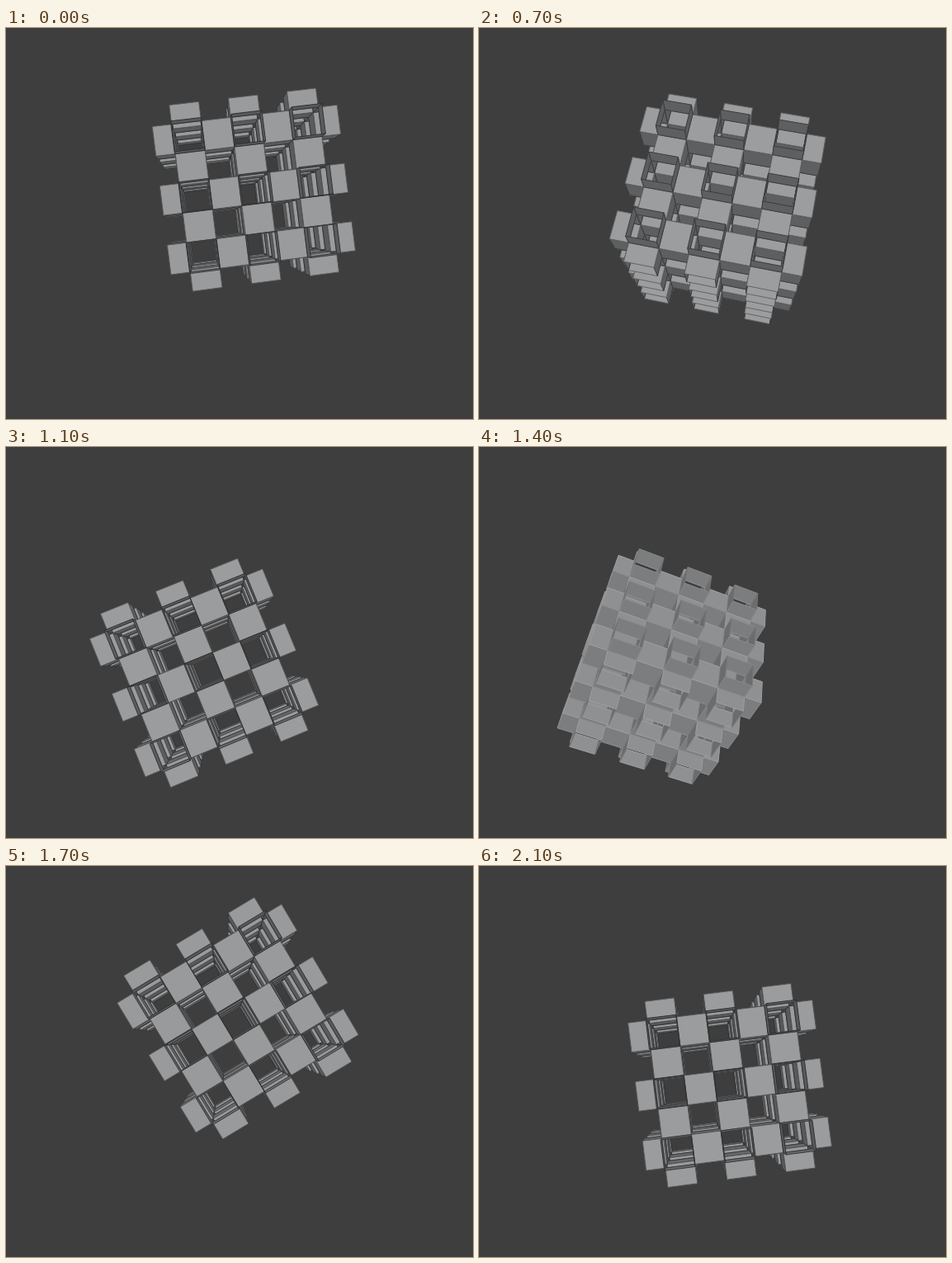
Animation, 566 px wide and 474 px high, one loop 2900 ms. Source, as an HTML page with a canvas:

```html
<!DOCTYPE html>
<html lang="en">
<head>
<meta charset="utf-8">
<title>Tumbling lattice</title>
<style>
html, body { margin: 0; width: 100%; height: 100%; overflow: hidden; background: #3e3e3e; }
canvas { display: block; }
</style>
</head>
<body>
<canvas id="stage" width="566" height="474"></canvas>
<script>
const ctx = document.getElementById('stage').getContext('2d');
const LOOP = 2900, STEP = 100;
const MID = [283, 237], FOCAL = 772, DIST = 24;
const LIGHT = [0, -0.25, 0.97];
const STUB = 0.65; // length of the open outer arms, in cells

const dot = (p, q) => p[0] * q[0] + p[1] * q[1] + p[2] * q[2];
const cross = (p, q) => [
  p[1] * q[2] - p[2] * q[1],
  p[2] * q[0] - p[0] * q[2],
  p[0] * q[1] - p[1] * q[0]
];
const unit = p => p.map(c => c / Math.hypot(...p));
const mix = (p, q, k) => p + (q - p) * k;
const mixAll = (p, q, k) => p.map((c, i) => mix(c, q[i], k));

// Square tubes along each axis join the 3 x 3 x 3 nodes.
function buildFaces() {
  const faces = [], nodes = [-2, 0, 2];
  const spans = [[-2.5 - STUB, -2.5], [-1.5, -0.5], [0.5, 1.5], [2.5, 2.5 + STUB]];
  for (let axis = 0; axis < 3; axis++) {
    const e = (axis + 1) % 3, f = (axis + 2) % 3;
    for (const u of nodes) for (const v of nodes) for (const [lo, hi] of spans) {
      const point = (w, du, dv) => {
        const p = [];
        p[axis] = w; p[e] = u + du; p[f] = v + dv;
        return p;
      };
      for (const side of [-0.5, 0.5]) {
        const ends = [[lo, -0.5], [hi, -0.5], [hi, 0.5], [lo, 0.5]];
        faces.push({ normal: e, pts: ends.map(([w, d]) => point(w, side, d)) });
        faces.push({ normal: f, pts: ends.map(([w, d]) => point(w, d, side)) });
      }
    }
  }
  return faces;
}

// A pose holds the lattice directions a and b (z towards the viewer),
// the centre on the stage and a zoom.
const pose = (a, b, x, y, zoom = 1) => ({ a: unit(a), b: unit(b), place: [x, y, zoom] });

// Nearly head-on view: turned by deg, with depth lines running to (vx, vy).
function head(deg, vx, vy, x, y, zoom) {
  const r = deg * Math.PI / 180, c = Math.cos(r), s = Math.sin(r);
  const u = (vx - MID[0]) / FOCAL, v = (vy - MID[1]) / FOCAL;
  return pose([c, s, c * u + s * v], [-s, c, c * v - s * u], x, y, zoom);
}

// The same view reached by a quarter roll.
const rolled = p => ({ a: p.a, b: unit(cross(p.a, p.b)), place: p.place });

const rest = head(-7.2, 240, 240, 295, 200);
const lean = head(7.2, 245, 262, 303, 203);
const edgeOne = pose([69, 17.5, 18], [-25, 54, 43], 285, 248, 1.04);
const low = head(-22.2, 265, 265, 243, 272);
const edgeTwo = pose([62, 22, -13.3], [-6, 46, 48], 225, 267, 0.95);
const high = head(-31, 265, 210, 280, 188, 1.02);
const settle = head(-7.2, 265, 265, 300, 265);

const moves = [
  [0, 500, rest, rest],
  [500, 900, lean, edgeOne],
  [900, 1100, edgeOne, rolled(low)],
  [1100, 1400, low, edgeTwo],
  [1400, 1700, edgeTwo, rolled(high)],
  [1700, 2100, high, rolled(settle)],
  [2100, LOOP, settle, settle]
];

const faces = buildFaces();

function draw(t) {
  const [t0, t1, from, to] = moves.find(m => t < m[1]);
  const k = (t - t0) / (t1 - t0);
  const a = unit(mixAll(from.a, to.a, k));
  const rough = mixAll(from.b, to.b, k);
  const along = dot(a, rough);
  const b = unit(rough.map((c, i) => c - a[i] * along));
  const axes = [a, b, cross(a, b)];
  const [x, y, zoom] = mixAll(from.place, to.place, k);
  const depth = DIST / zoom;
  const origin = [(x - MID[0]) * depth / FOCAL, (y - MID[1]) * depth / FOCAL, -depth];
  const move = p => origin.map((c, i) => c + p[0] * axes[0][i] + p[1] * axes[1][i] + p[2] * axes[2][i]);

  // Seams are dark head-on and slightly bright at an angle.
  const facing = Math.max(...axes.map(n => Math.abs(n[2])));
  const seam = 1.1 - 0.55 * Math.min(1, Math.max(0, (facing - 0.75) * 4.5));

  const list = faces.map(face => {
    const pts = face.pts.map(move);
    const mid = [0, 1, 2].map(i => (pts[0][i] + pts[2][i]) / 2);
    let n = axes[face.normal];
    if (dot(n, mid) > 0) n = n.map(c => -c);
    return { pts, far: dot(mid, mid), shade: 88 + 68 * Math.max(0, dot(n, LIGHT)) };
  }).sort((p, q) => q.far - p.far);

  const gray = v => `rgb(${v}, ${v + 1}, ${v + 2})`;
  ctx.fillStyle = '#3e3e3e';
  ctx.fillRect(0, 0, 566, 474);
  ctx.lineWidth = 1;
  ctx.lineJoin = 'round';
  for (const { pts, shade } of list) {
    ctx.beginPath();
    for (const p of pts) ctx.lineTo(MID[0] - FOCAL * p[0] / p[2], MID[1] - FOCAL * p[1] / p[2]);
    ctx.closePath();
    ctx.fillStyle = gray(Math.round(shade));
    ctx.strokeStyle = gray(Math.round(shade * seam));
    ctx.fill();
    ctx.stroke();
  }
}

const start = performance.now();
function tick() {
  const t = (performance.now() - start) % LOOP;
  draw(Math.floor(t / STEP) * STEP);
  requestAnimationFrame(tick);
}
tick();
</script>
</body>
</html>
```
